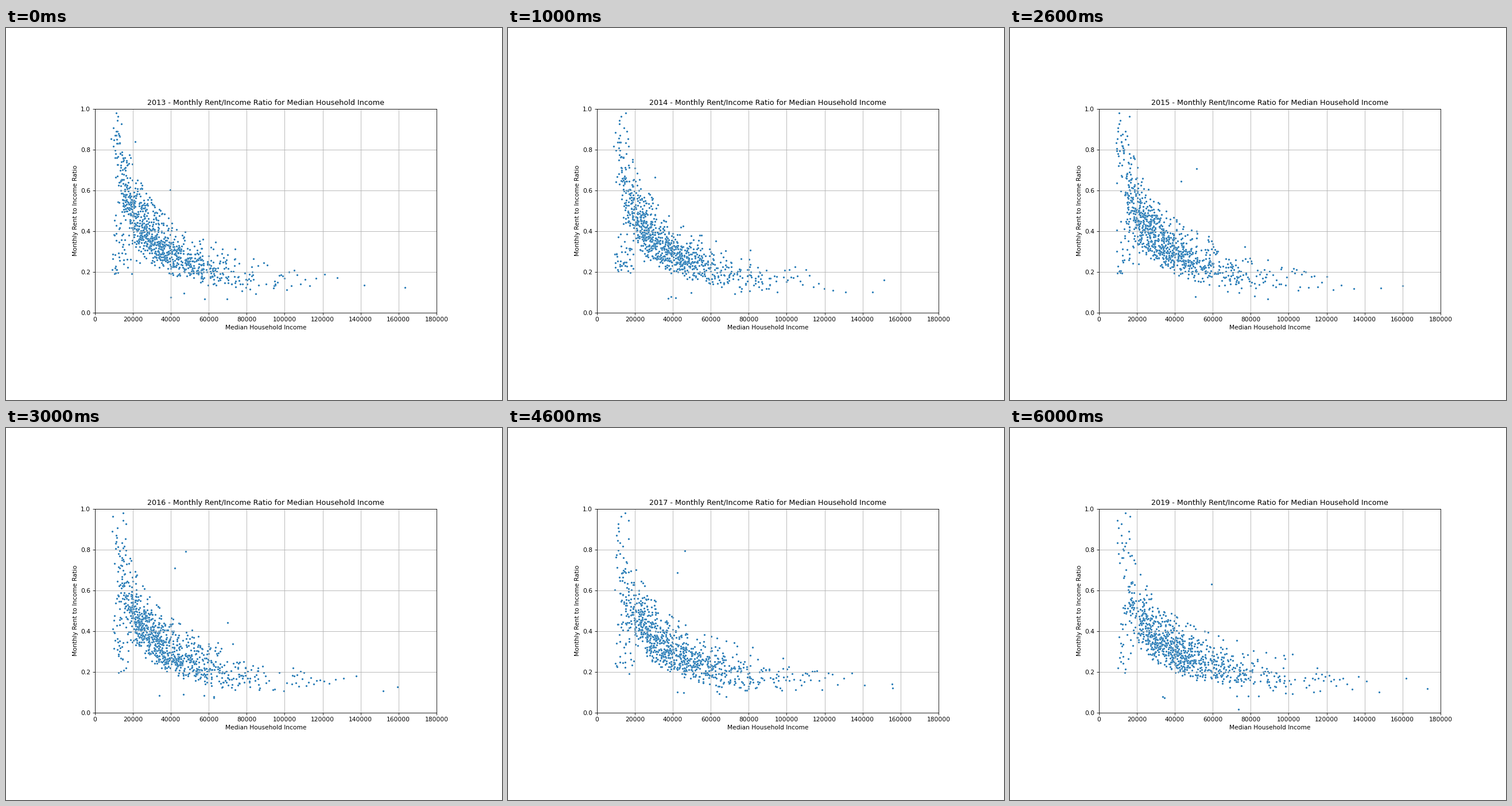
These frames come from a looping animation (864 px wide and 648 px high, 7 s). A matplotlib script:

```python
import numpy as np
import matplotlib.pyplot as plt
from matplotlib.animation import FuncAnimation

W, H, DPI = 864, 648, 76.8
LEFT, RIGHT, TOP, BOTTOM = 154.7, 749.9, 140.8, 495.5
MARKER = 10

# the farthest and most isolated points of each year: income in thousands, ratio
LANDMARKS = {
    2013: [(163.4, .123), (39.8, .603), (21.2, .840)],
    2014: [(151.3, .160), (30.5, .664)],
    2015: [(160.2, .130), (51.4, .705), (43.4, .645)],
    2016: [(159.6, .125), (48.0, .790), (42.2, .710), (69.9, .440)],
    2017: [(155.8, .121), (46.3, .795), (42.3, .687)],
    2018: [(170.2, .112), (31.3, .965), (51.8, .735)],
    2019: [(173.1, .116), (59.3, .630), (73.6, .016)],
}


def main_cloud(rng, t, limit):
    """Rent grows more slowly than income, so the ratio falls along a curve."""
    n = 980 - 10 * t
    income = (32 + 1.6 * t) * np.exp(0.51 * rng.standard_normal(n))
    rent = (10 - 0.03 * t) * (income / 20) ** (0.23 + 0.015 * t)
    spread = 0.14 + 0.12 * np.clip(income / 80, 0, 1)
    z = np.clip(rng.standard_normal(n), -2.2, 2.2)
    ratio = rent / income * np.exp(spread * z)
    keep = (income > 9.2) & (income < limit) & (ratio < 0.9)
    return income[keep], ratio[keep]


def low_rent(rng, t):
    n = 46 - 4 * t
    income = 9 + rng.gamma(2, 2.5, n)
    return income, 0.19 + 0.3 * rng.beta(1, 1.4, n) * np.clip(1.5 - income / 25, 0.1, 1)


def high_ratio(rng):
    n = 13
    return rng.uniform(8.5, 17, n), np.linspace(0.76, 0.98, n)


def stragglers(rng):
    n = 5
    return rng.uniform(30, 90, n), rng.uniform(0.065, 0.105, n)


def rich_tail(rng, t, limit):
    """Points thin out evenly towards high incomes."""
    n = 17 + t
    income = limit - 13 * np.log(1 - (np.arange(n) + 0.5) / n)
    ratio = 0.175 - 0.001 * (income - limit) + 0.03 * rng.standard_normal(n)
    return income, np.clip(ratio, 0.1, 0.24)


def scatter_year(year):
    t = year - min(LANDMARKS)
    rng = np.random.default_rng(year)
    limit = 96 + 2.7 * t
    groups = [main_cloud(rng, t, limit), low_rent(rng, t), high_ratio(rng),
              stragglers(rng), rich_tail(rng, t, limit), np.transpose(LANDMARKS[year])]
    return np.hstack(groups).T * [1000, 1]


years = list(LANDMARKS)
points = [scatter_year(year) for year in years]

fig = plt.figure(figsize=(W / DPI, H / DPI), dpi=DPI, facecolor="white")
ax = fig.add_axes([LEFT / W, 1 - BOTTOM / H, (RIGHT - LEFT) / W, (BOTTOM - TOP) / H])
dots = ax.scatter([], [], s=MARKER, color="#1f77b4", edgecolors="white",
                  linewidths=0.08 * MARKER ** 0.5)
ax.set_xlim(0, 180000)
ax.set_ylim(0, 1)
ax.set_xlabel("Median Household Income")
ax.set_ylabel("Monthly Rent to Income Ratio")
ax.grid(True)
title = ax.set_title("")


def draw(i):
    dots.set_offsets(points[i])
    title.set_text(f"{years[i]} - Monthly Rent/Income Ratio for Median Household Income")
    return dots, title


anim = FuncAnimation(fig, draw, frames=len(years), interval=1000, repeat=True)
plt.show()
```
